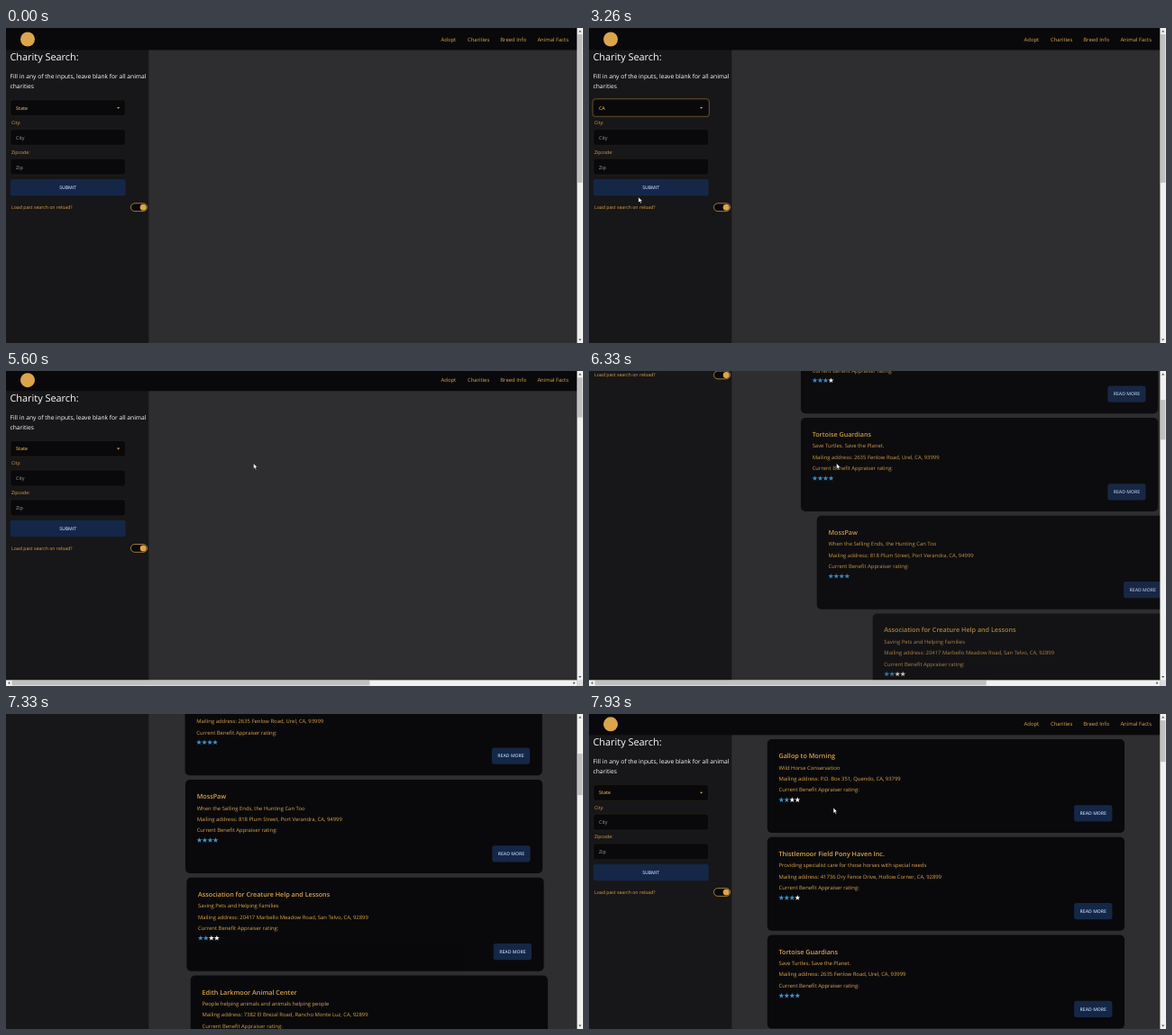
An HTML page for the animation above (8000 ms loop, 640x350 px).

```html
<!DOCTYPE html>
<html lang="en">
<head>
<meta charset="utf-8">
<title>Charity search</title>
<style>
  html, body { margin: 0; width: 100%; height: 100%; overflow: hidden; background: #2e2d2f; }
  svg { display: block; }
  text { font-family: "Open Sans", "Noto Sans", sans-serif; font-size: 5.9px; fill: #dca54c; text-rendering: geometricPrecision; white-space: pre; }
  .small { font-size: 5.2px; }
  .title { font-size: 7.2px; font-weight: 600; }
  .button { font-size: 5.1px; font-weight: 600; fill: #b5cdf2; text-anchor: middle; }
  .hint { font-size: 5.4px; fill: #a2a09c; }
  .white { fill: #fff; }
  .field { fill: #09090b; stroke: #dca54c; stroke-opacity: .17; stroke-width: .4; }
</style>
</head>
<body>
<svg id="stage" width="640" height="350" viewBox="0 0 640 350"></svg>
<script>
const LOOP = 8000, RESULTS = 4730, RELOAD = 5530;
const PITCH = 108.75, SLIDE = 396, DECAY = 264;
const GOLD = '#dca54c', NAVY = '#152747', BLACK = '#09090b';

// name, motto, address, stars, time the card starts to slide in
const charities = [
  ['Gallop to Morning', 'Wild Horse Conservation', 'P.O. Box 351, Quendo, CA, 93799', 2, 5706],
  ['Thistlemoor Field Pony Haven Inc.', 'Providing specialist care for those horses with special needs', '41736 Dry Fence Drive, Hollow Corner, CA, 92899', 3, 5706],
  ['Tortoise Guardians', 'Save Turtles. Save the Planet.', '2635 Fenlow Road, Urel, CA, 93999', 4, 5706],
  ['MossPaw', 'When the Selling Ends, the Hunting Can Too', '818 Plum Street, Port Verandra, CA, 94999', 4, 5809],
  ['Association for Creature Help and Lessons', 'Saving Pets and Helping Families', '20417 Marbello Meadow Road, San Telvo, CA, 92899', 2, 6008],
  ['Edith Larkmoor Animal Center', 'People helping animals and animals helping people', '7382 El Brezal Road, Rancho Monte Luz, CA, 92899', 4, 6266]
];

// time, value(s)
const scrollKeys = [[RELOAD, 0], [5600, 2.3], [6330, 194.8], [6900, 282.5], [7330, 282.5], [7930, 1.2], [LOOP, 0.6]];
const cursorKeys = [[2800, 60, 100], [3000, 60, 112], [3260, 54.8, 187.8], [3500, 66, 178], [4050, 68, 177],
  [4660, 274.4, 102.6], [7330, 274.4, 102.6], [7930, 271, 104]];

const text = (x, y, s, cls = '') => `<text x="${x}" y="${y}" class="${cls}">${s}</text>`;
const rect = (x, y, w, h, rx, more) => `<rect x="${x}" y="${y}" width="${w}" height="${h}" rx="${rx}" ${more}/>`;
const path = (d, fill, more = '') => `<path d="${d}" fill="${fill}" ${more}/>`;

function star(x, y, fill) {
  let points = '';
  for (let i = 0; i < 10; i++) {
    const r = i % 2 ? 1.25 : 3.1, a = i * Math.PI / 5;
    points += `${(x + r * Math.sin(a)).toFixed(2)},${(y - r * Math.cos(a)).toFixed(2)} `;
  }
  return `<polygon points="${points}" fill="${fill}"/>`;
}

function card([name, motto, address, stars]) {
  return '<g class="card">' +
    rect(197.7, 29.3, 396.2, 104, 5, `fill="${BLACK}"`) +
    text(210.4, 50.3, name, 'title') +
    text(210.4, 62.8, motto) +
    text(210.4, 75.2, 'Mailing address: ' + address) +
    text(210.4, 87.7, 'Current Benefit Appraiser rating:') +
    [0, 1, 2, 3].map(i => star(213.2 + 6 * i, 96.6, i < stars ? '#3f93cc' : '#fff')).join('') +
    rect(538, 102.5, 42.3, 18.2, 2.7, `fill="${NAVY}"`) +
    text(559.2, 113.4, 'READ MORE', 'button') + '</g>';
}

const sidebar =
  text(4.5, 36, 'Charity Search:', 'white" style="font-size:10.9px') +
  text(4.5, 56, 'Fill in any of the inputs, leave blank for all animal', 'white" style="font-size:6.68px') +
  text(4.5, 67, 'charities', 'white" style="font-size:6.68px') +
  rect(3.9, 78.6, 129.6, 20, 3.4, `id="ring" fill="none" stroke="${GOLD}" stroke-opacity=".5" stroke-width=".7"`) +
  rect(5, 79.8, 127.4, 17.6, 2.7, 'class="field"') +
  text(11, 90.7, 'State', 'small" id="state" font-weight="600') +
  path('M122.9 87.9h3.4l-1.7 1.9z', GOLD) +
  text(6, 106.8, 'City:', 'small') +
  rect(5, 112.4, 127.4, 17.8, 2.7, 'class="field"') +
  text(11, 123.7, 'City', 'hint') +
  text(6, 139.6, 'Zipcode:', 'small') +
  rect(5, 145.2, 127.4, 17.8, 2.7, 'class="field"') +
  text(11, 156.5, 'Zip', 'hint') +
  rect(4.7, 168, 128.1, 18.5, 2.7, `fill="${NAVY}"`) +
  text(68.7, 179.1, 'SUBMIT', 'button') +
  text(6, 201, 'Load past search on reload?', 'small') +
  rect(138.4, 194.8, 18.2, 8.8, 4.4, `fill="${BLACK}" stroke="${GOLD}" stroke-width=".7"`) +
  `<circle cx="152.2" cy="199.2" r="3.5" fill="${GOLD}"/>`;

const header =
  rect(0, 0, 633.4, 24.5, 0, `fill="${BLACK}"`) +
  `<circle cx="24" cy="12.5" r="8" fill="${GOLD}"/>` +
  [[482.6, 'Adopt'], [512, 'Charities'], [548.3, 'Breed Info'], [589.4, 'Animal Facts']]
    .map(([x, s]) => text(x, 14.6, s)).join('');

const stage = document.getElementById('stage');
stage.innerHTML =
  rect(0, 0, 640, 350, 0, 'fill="#2e2d2f"') +
  rect(0, 0, 158.3, 350, 0, 'fill="#171618"') +
  `<g id="page">${sidebar}<g id="cards">${charities.map(card).join('')}</g>${header}</g>` +
  rect(633.4, 0, 6.6, 350, 0, 'fill="#f1f1f1"') +
  path('M635.1 4.4h3.2l-1.6-2z', '#505050') +
  rect(634, 7, 5.4, 0, 0, 'id="vthumb" fill="#c1c1c1"') +
  '<g id="varrow">' + path('M635.1 345.6h3.2l-1.6 2z', '#505050') + '</g>' +
  '<g id="hbar">' + rect(0, 343.4, 633.4, 6.6, 0, 'fill="#f1f1f1"') +
  rect(633.4, 343.4, 6.6, 6.6, 0, 'fill="#dcdcdc"') +
  path('M4.2 345.1v3.2l-2-1.6z', '#505050') + path('M629.4 345.1v3.2l2-1.6z', '#505050') +
  rect(6.6, 344, 0, 5.4, 0, 'id="hthumb" fill="#c1c1c1"') + '</g>' +
  '<g id="cursor">' + path('M0 0V6.3L1.5 5 2.5 7.3 3.6 6.8 2.6 4.6 4.5 4.5Z', '#fff', 'stroke="#000" stroke-width=".5"') + '</g>';

const $ = id => document.getElementById(id);
const cards = [...document.querySelectorAll('.card')];
const show = (el, on) => el.setAttribute('visibility', on ? 'visible' : 'hidden');
const move = (el, x, y) => el.setAttribute('transform', `translate(${x.toFixed(2)} ${y.toFixed(2)})`);

function at(keys, t, k = 1, ease = p => p) {
  if (t <= keys[0][0]) return keys[0][k];
  const i = keys.findIndex(key => key[0] > t);
  if (i < 0) return keys[keys.length - 1][k];
  const a = keys[i - 1], b = keys[i];
  return a[k] + (b[k] - a[k]) * ease((t - a[0]) / (b[0] - a[0]));
}
const smooth = p => p * p * (3 - 2 * p);

function draw(t) {
  const loaded = t >= RESULTS;
  const scroll = at(scrollKeys, t, 1, t > 7330 ? smooth : undefined);
  move($('page'), 0, -scroll);

  const chosen = t >= 2460 && !loaded;
  $('state').textContent = chosen ? 'CA' : 'State';
  show($('ring'), t >= 800 && t < 3860);

  let widest = 0;
  cards.forEach((el, i) => {
    const start = charities[i][4];
    const offset = t < RELOAD ? 0 : SLIDE * Math.exp(-Math.max(0, t - start) / DECAY);
    if (i < 3 || t > start) widest = Math.max(widest, offset);
    move(el, offset, PITCH * i);
    el.setAttribute('opacity', 1 - offset / SLIDE);
  });
  show($('cards'), loaded);

  const sideways = widest > 39.5;
  show($('hbar'), sideways);
  $('hthumb').setAttribute('width', 620 * 633.4 / (593.9 + widest));
  const view = sideways ? 343.4 : 350, track = view - 14, height = loaded ? 2557 : 713;
  $('vthumb').setAttribute('y', 7 + track * scroll / height);
  $('vthumb').setAttribute('height', track * view / height);
  move($('varrow'), 0, view - 350);

  show($('cursor'), t >= 2800 && !(t >= 7230 && t < 7400));
  move($('cursor'), at(cursorKeys, t, 1, smooth), at(cursorKeys, t, 2, smooth));
}

let begin;
function tick(now) {
  begin ??= now;
  draw((now - begin) % LOOP);
  requestAnimationFrame(tick);
}
draw(0);
requestAnimationFrame(tick);
</script>
</body>
</html>
```
